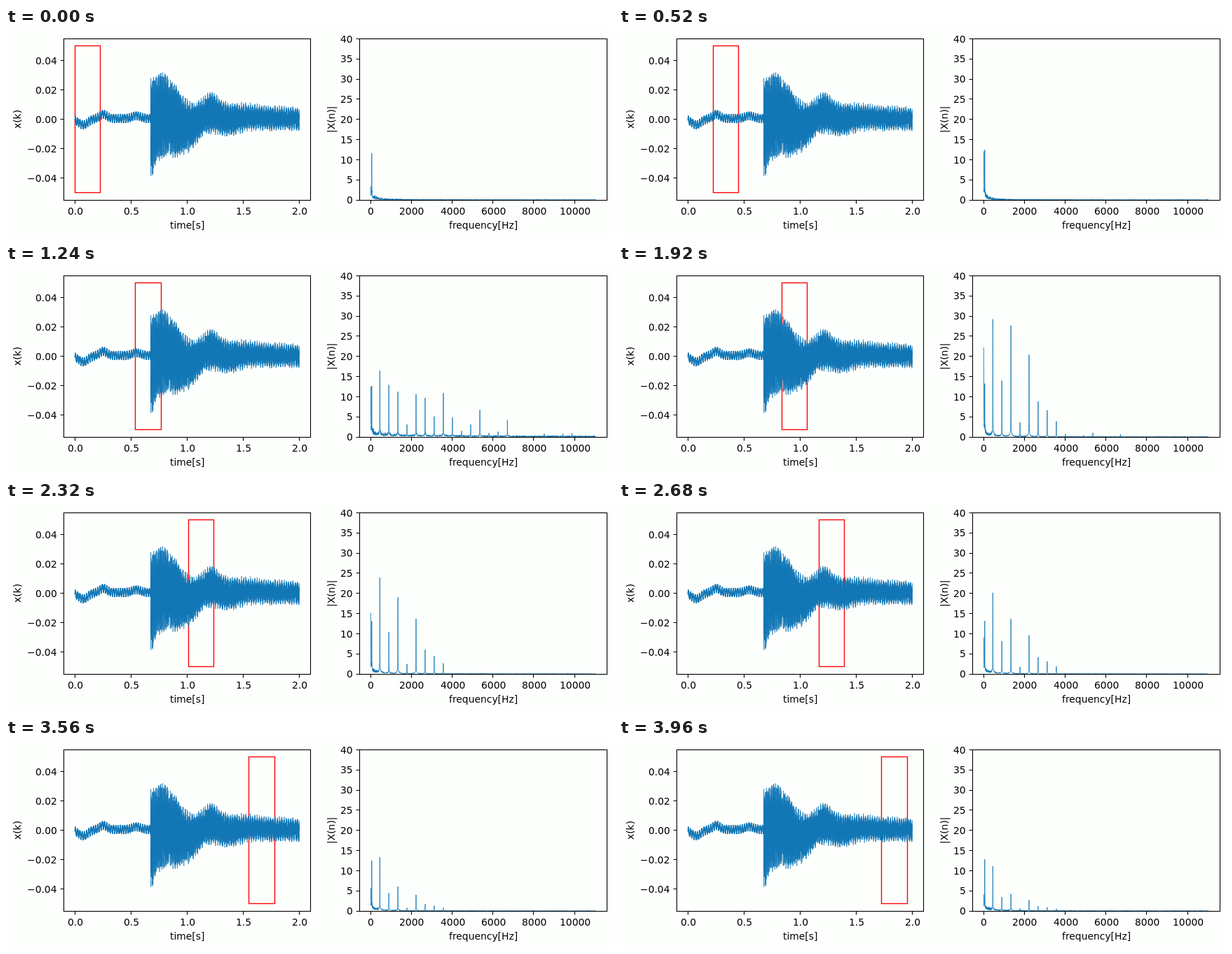
These frames come from a looping animation (866 by 299 pixels, 4000 ms). An HTML page with a canvas:

```html
<!DOCTYPE html>
<html lang="en">
<head>
<meta charset="utf-8">
<title>Sliding window spectrum</title>
<style>
  html, body { margin: 0; width: 100%; height: 100%; overflow: hidden; background: #fdfffd; }
  canvas { display: block; width: 866px; height: 299px; }
</style>
</head>
<body>
<canvas id="stage" width="866" height="299"></canvas>
<script>
const W = 866, H = 299, STEP_MS = 40, STEPS = 100;
const BLUE = '#1478b6', PAPER = '#fdfffd';
const ctx = document.getElementById('stage').getContext('2d');

const LEFT = { x: 82.5, y: 15.5, w: 352, h: 231 };
const RIGHT = { x: 504.5, y: 15.5, w: 353, h: 231 };
const MID_Y = 131;
const T0 = 98.3, PX_PER_S = 160, HOP = 2.793, WINDOW = 36.3;
const F0 = 520.4, PX_PER_HZ = 0.02907, BINS = 2500, BIN_HZ = 4.41;
const FLOOR = 246.2, PX_PER_MAG = 5.77;

// Hash of two integers to 0..1
function rand(a, b = 0) {
  let h = Math.imul(a + 1, 374761393) ^ Math.imul(b + 7, 668265263);
  h = Math.imul(h ^ (h >>> 13), 1274126177);
  h = Math.imul(h ^ (h >>> 16), 2246822519);
  return ((h ^ (h >>> 15)) >>> 0) / 4294967296;
}

function bump(x, center, width) {
  return Math.exp(-(((x - center) / width) ** 2) / 2);
}

function range(n, f) { return Array.from({ length: n }, (_, i) => f(i)); }
function snap(v) { return Math.floor(v) + 0.5; }

function makeLayer(paint) {
  const layer = document.createElement('canvas');
  layer.width = W;
  layer.height = H;
  paint(layer.getContext('2d'));
  return layer;
}

// ---- Waveform: mains hum, then a plucked note that rings out ----
const ONSET = 206.6;

function quietLine(x) {
  return 129.5 + 9 * bump(x, 110, 7) - 6 * bump(x, 139, 5) - 4 * bump(x, 186, 6);
}

// Reach of the note above and below the zero line, d pixels after the onset
function reachUp(d) {
  return 18 + 52 * bump(d, 16, 20) + 12 * Math.exp(-d / 3)
    + 17 * bump(d, 85, 11) + 6 * bump(d, 115, 40);
}

function reachDown(d) {
  return 17 + 42 * Math.exp(-d / 6) + 40 / (1 + Math.exp((d - 65) / 8)) + 9 * bump(d, 110, 13);
}

function tone(p) {
  return (0.55 * Math.sin(p) + 0.3 * Math.sin(3 * p + 1) + 0.25 * Math.sin(5 * p + 2)) / TONE_PEAK;
}
let TONE_PEAK = 1;
TONE_PEAK = Math.max(...range(400, i => tone(i * Math.PI / 200)));

function waveY(i, t) {
  const x = T0 + t * PX_PER_S, d = x - ONSET;
  const hum = -5 * Math.sin(2 * Math.PI * 50 * t) + (rand(i, 3) - 0.5) * 3.5;
  if (d < 0) return quietLine(x) + hum;
  const up = reachUp(d), down = reachDown(d);
  const cycles = 443 * t, r = rand(Math.floor(cycles), 11);
  const half = ((up + down) / 2 - 4.5) * (1 - 0.42 * r * r);
  return 130.5 + (down - up) / 2 + hum + half * tone(2 * Math.PI * cycles);
}

const wave = makeLayer(c => {
  const count = 22050, chunk = 1050;
  c.strokeStyle = BLUE;
  c.lineWidth = 0.69;
  c.lineJoin = 'bevel';
  for (let from = 0; from < count; from += chunk) {
    c.beginPath();
    for (let i = from; i <= from + chunk; i++) {
      const t = 2 * i / count;
      c.lineTo(T0 + t * PX_PER_S, waveY(i, t));
    }
    c.stroke();
  }
});

// ---- Spectrum ----
const ENTER = 25.9, HIT = 31, FULL = 39, RING = 48;  // steps as the window meets the note
const hits = [16.5, 13, 11, 2.5, 10.8, 9.7, 5, 11, 4.8, 1.4, 3, 6.8, 0.9, 1.2, 4.3];
const rings = [29.5, 14.1, 28.3, 3.7, 20.9, 9, 6.8, 4];

function harmonicBin(n) {
  return Math.round(12.88 * n * (1 + 0.0006 * n) / (PX_PER_HZ * BIN_HZ));
}

function harmonicLevel(n, step) {
  if (step < ENTER) return 0;
  const hit = hits[n - 1] ?? 1.3 * rand(n, 5);
  if (step < HIT) return hit * (step - ENTER) / (HIT - ENTER);
  const ring = rings[n - 1] ?? 0.15 * hit;
  const rate = n > rings.length ? 0.15 : Math.min(0.01 + 0.009 * n, 0.04);
  const decay = at => ring * Math.exp(-rate * (at - RING));
  if (step > FULL) return decay(step);
  return hit + (decay(FULL) - hit) * (step - HIT) / (FULL - HIT);
}

function peaksAt(step) {
  const drift = 8 * Math.sin(Math.PI * (step + 8) / 125)
    + 14 * bump(step, RING, 8) + 9 * bump(step, 18, 9);
  return [
    { bin: 0, level: drift },
    { bin: 11, level: 12.3 - 1.8 * Math.exp(-step / 5) },
    ...range(22, i => ({ bin: harmonicBin(i + 1), level: harmonicLevel(i + 1, step) }))
  ];
}

function drawSpectrum(step) {
  const peaks = peaksAt(step);
  const attack = step < ENTER ? 0 : 0.4 * bump(step, 31, 4);
  const slot = Math.floor(step / 12), mix = step / 12 - slot;
  ctx.strokeStyle = BLUE;
  ctx.lineWidth = 0.85;
  ctx.lineJoin = 'bevel';
  ctx.beginPath();
  for (let b = 0; b <= BINS; b++) {
    const hz = b * BIN_HZ;
    const r = rand(b, slot) * (1 - mix) + rand(b, slot + 1) * mix;
    const noise = 0.1 + 1.5 * Math.exp(-hz / 260) + 0.35 * Math.exp(-hz / 2200)
      + attack * (0.5 + Math.exp(-hz / 6000));
    let mag = noise * (0.2 + 0.8 * r * r);
    for (const p of peaks) {
      const d = Math.abs(b - p.bin);
      if (d < 90) mag += p.level * (d ? 0.32 / (d + 0.2) * (1 - d / 90) : 0.97);
    }
    ctx.lineTo(F0 + hz * PX_PER_HZ, FLOOR - mag * PX_PER_MAG);
  }
  ctx.stroke();
}

// ---- Axes ----
function centered(c, text, x, y) {
  c.fillText(text, Math.ceil(x - c.measureText(text).width / 2), y);
}

function sideLabel(c, text, x) {
  c.save();
  c.translate(x, MID_Y);
  c.rotate(-Math.PI / 2);
  centered(c, text, 0, 0);
  c.restore();
}

function drawAxes(c, box, xTicks, yTicks, title) {
  const bottom = box.y + box.h;
  c.strokeRect(box.x, box.y, box.w, box.h);
  c.beginPath();
  for (const [x, text] of xTicks) {
    c.moveTo(snap(x), bottom);
    c.lineTo(snap(x), bottom + 5);
    centered(c, text, x, 267);
  }
  for (const [y, text] of yTicks) {
    c.moveTo(box.x, snap(y));
    c.lineTo(box.x - 5, snap(y));
    c.fillText(text, Math.round(box.x - 9.8 - c.measureText(text).width), Math.round(y + 5.1));
  }
  c.stroke();
  centered(c, title, box.x + box.w / 2, 287);
}

function signed(v) {
  return (v < 0 ? '\u2212' : '') + Math.abs(v).toFixed(2);
}

const axes = makeLayer(c => {
  c.font = '13.89px "DejaVu Sans", sans-serif';
  c.fillStyle = c.strokeStyle = '#000';
  c.lineWidth = 1.11;
  drawAxes(c, LEFT,
    range(5, i => [T0 + 80 * i, (i / 2).toFixed(1)]),
    range(5, i => [46.5 + 42 * i, signed((2 - i) / 50)]),
    'time[s]');
  drawAxes(c, RIGHT,
    range(6, i => [F0 + 2000 * i * PX_PER_HZ, String(2000 * i)]),
    range(9, i => [FLOOR - 5 * i * PX_PER_MAG, String(5 * i)]),
    'frequency[Hz]');
  sideLabel(c, 'x(k)', 21);
  sideLabel(c, '|X(n)|', 469);
});

// ---- Playback ----
function draw(step) {
  ctx.fillStyle = PAPER;
  ctx.fillRect(0, 0, W, H);
  const start = T0 + HOP * step, x = snap(start);
  ctx.strokeStyle = '#f00';
  ctx.lineWidth = 1.39;
  ctx.lineJoin = 'miter';
  ctx.strokeRect(x, 25.5, snap(start + WINDOW) - x, 210);
  ctx.drawImage(wave, 0, 0);
  drawSpectrum(step);
  ctx.drawImage(axes, 0, 0);
}

const began = performance.now();
let shown = -1;

function tick() {
  const step = Math.floor((performance.now() - began) / STEP_MS) % STEPS;
  if (step !== shown) {
    shown = step;
    draw(step);
  }
  requestAnimationFrame(tick);
}
tick();
</script>
</body>
</html>
```
